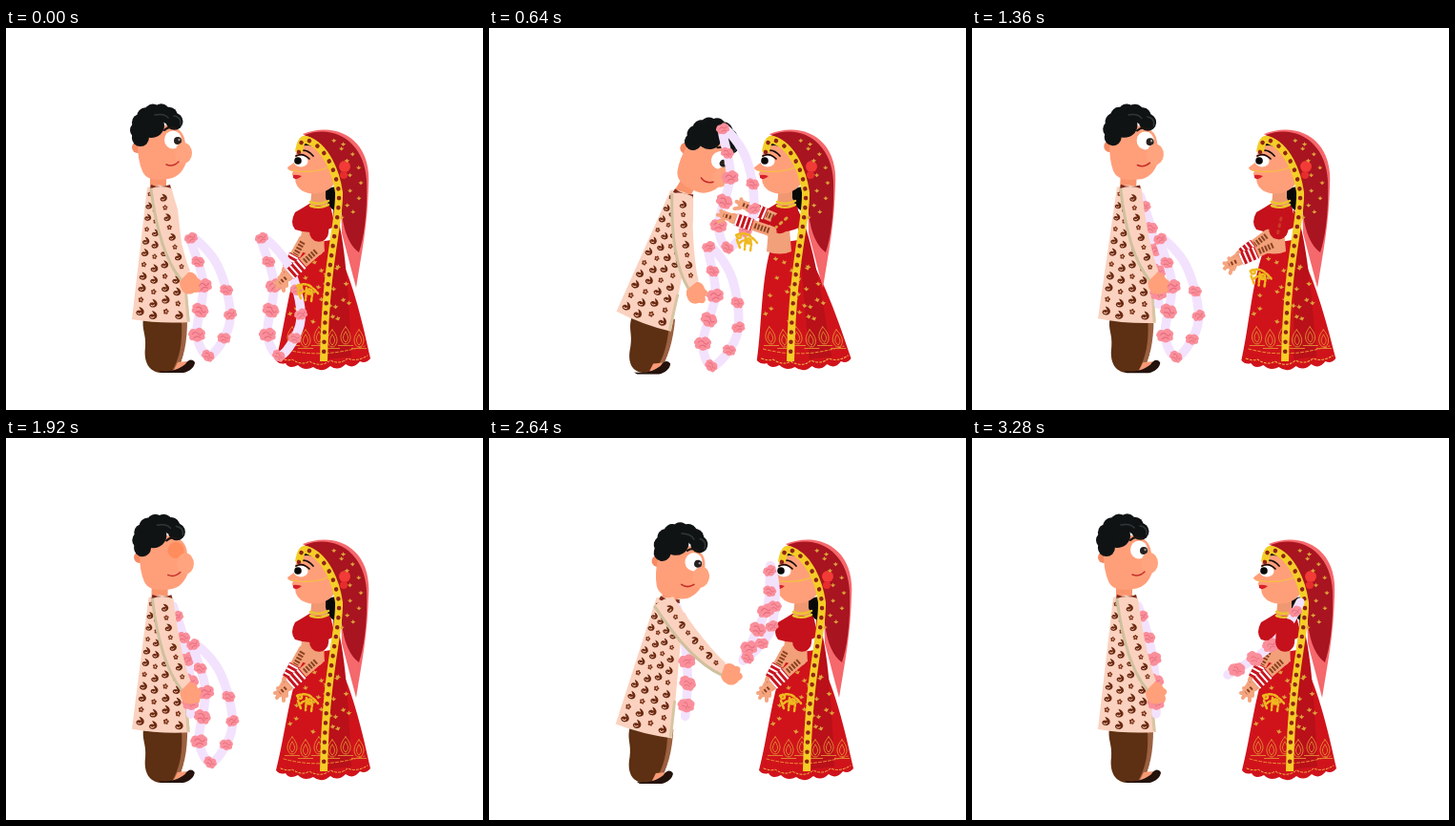
Recreate the animation shown at these times as an HTML page. Size 500x400 px, loop 4400 ms.

```html
<!DOCTYPE html>
<html lang="en">
<head>
<meta charset="utf-8">
<title>Garland exchange</title>
<style>
html, body { margin: 0; width: 100%; height: 100%; overflow: hidden; background: #fff; }
svg { display: block; width: 500px; height: 400px; }
.line { fill: none; stroke-linecap: round; stroke-linejoin: round; }
</style>
</head>
<body>
<svg viewBox="0 0 500 400">
  <defs>
    <g id="paisley">
      <path d="M-2-5C3-5 6-1 4 2C2 5-3 5-4 2C-4-1-1-2 1-1C0-3-1-3-2-5Z" fill="#6b2a12"/>
      <path class="line" d="M-2 2Q0 3.500 1.500 1" stroke="#fbd2bf"/>
    </g>
    <g id="sprig" fill="#7b3318">
      <circle cx="-1.800" cy="-.8" r="1.300"/><circle cx="1.800" cy="-.8" r="1.300"/>
      <circle cy="-2.300" r="1.200"/><circle cx="-1" cy="1.500" r="1.300"/><circle cx="1.200" cy="1.500" r="1.200"/>
    </g>
    <g id="gold">
      <path d="M0 2L-3-1L-1-1L0-3L1-1L3-1Z" fill="#dda23c"/>
    </g>
    <g id="flame" class="line" stroke="#e28a32" stroke-width="1.100">
      <path d="M0-13C7-5 8 3 2 8H-2C-8 3-7-5 0-13ZM0-7C4-1 4 2 0 6C-4 2-4-1 0-7M-9 10H9"/>
    </g>
    <g id="rose">
      <path d="M-7-3Q-5-7-1-5Q3-8 6-4Q9-2 7 1Q8 5 4 5Q0 8-3 5Q-8 5-7 1Q-9-1-7-3Z" fill="#fa8f9b"/>
      <path class="line" d="M-4-1Q-1-4 1-1T5-1M-3 3Q0 0 3 3" stroke="#e56d7d"/>
    </g>
  </defs>

  <g id="legs">
    <path d="M144 304C142 316 147 320 146 334C144 350 150 360 162 361L179 360C187 345 188 330 188 306Z" fill="#5d3013"/>
    <path d="M186 304L190 305C190 328 187 347 177 361L173 361C183 345 185 328 184 307Z" fill="#9b6040"/>
  </g>
  <g id="shoe">
    <path d="M180 350L190 349L190 356L176 358Z" fill="#f79a75"/>
    <path d="M160 359C175 361 183 356 188 352C191 347 195 346 198 350C198 355 192 360 186 361H163Z" fill="#24120c"/>
  </g>

  <g id="groomHead">
    <path d="M151 148H168V172H151Z" fill="#f9946c"/>
    <ellipse cx="138" cy="125" rx="6" ry="6" fill="#f58a63"/>
    <path d="M138 123C138 108 149 103 164 102C180 102 187 109 188 121L190 137C187 149 180 157 170 158C157 160 147 159 143 150Q138 138 138 123Z" fill="#ff9f7a"/>
    <g id="hair" fill="#101314"><ellipse cx="152" cy="102" rx="14" ry="13"/></g>
    <path class="line" d="M156 91Q166 89 170 94M176 92Q184 93 183 101" stroke="#30383a" stroke-width="1.500"/>
    <path class="line" d="M166 107Q171 102 178 105" stroke="#1b1512" stroke-width="2.200"/>
    <g id="openEye">
      <ellipse cx="175" cy="117" rx="9" ry="9.500" fill="#fff"/>
      <circle cx="180" cy="118" r="4" fill="#26201e"/><circle cx="181.500" cy="117" r="1.200" fill="#999"/>
    </g>
    <circle id="shutEye" cx="176" cy="117" r="8.500" fill="#ff8c5c"/>
    <ellipse cx="186" cy="131" rx="9" ry="11" fill="#ffa47e"/>
    <path class="line" d="M168 143Q175 146 181 140" stroke="#c4302b" stroke-width="1.500"/>
  </g>
  <g id="kurta">
    <path d="M148 167Q160 162 173 167L180 190L193 308Q161 310 132 305Z" fill="#fbd2bf"/>
    <path class="line" d="M188 270L191 306" stroke="#d8c5a3" stroke-width="3"/>
    <path d="M152 164Q161 168 172 164L173 168Q161 171 151 168Z" fill="#7b2b1c"/>
  </g>

  <g id="skirt">
    <path d="M313 226L341 222C362 255 374 310 382 346Q377 352 371 349Q364 358 356 352Q348 360 340 354Q331 362 322 355Q313 360 306 353Q297 358 293 351Q287 353 283 348C293 310 297 262 313 226Z" fill="#d0131b"/>
    <path d="M343 190C352 200 358 250 362 344L338 347Z" fill="#b91019"/>
    <path class="line" d="M288 346Q296 349 300 347Q310 354 318 349Q330 356 340 348Q350 353 358 346Q368 350 379 343" stroke="#f0b94a" stroke-dasharray="2 2"/>
    <path class="line" d="M291 336Q330 347 376 333" stroke="#ec8a35" stroke-dasharray="3 2"/>
    <g id="skirtGold"></g>
  </g>

  <g id="bride">
    <path d="M311 111C345 97 384 115 380 165C379 205 373 235 367 272L352 215L350 140Z" fill="#f5686c"/>
    <path d="M310 211H332L334 234Q322 239 308 234Z" fill="#f2a079"/>
    <path d="M318 184Q328 180 340 186L345 208Q322 218 303 211Q297 204 303 193Q310 189 318 184Z" fill="#c5111b"/>
    <path d="M321 164H338V186H319Z" fill="#ef9871"/>
    <path d="M335 170Q347 162 348 172L348 192Q340 192 335 178Z" fill="#090909"/>
    <path class="line" d="M319 182Q328 186 338 181M319 186Q328 190 338 185" stroke="#edc52d" stroke-width="2.500" stroke-dasharray="2 1"/>
    <path d="M312 119C304 127 302 136 303 140L295 146Q295 149 301 150Q298 154 303 157Q303 168 314 172C330 177 344 169 348 155L343 125Q328 112 312 119Z" fill="#ff9f7a"/>
    <path d="M308 124Q312 115 323 119L330 126Q318 121 308 124Z" fill="#100c0c"/>
    <ellipse cx="309" cy="139.500" rx="7.500" ry="6" fill="#fff"/>
    <circle cx="306" cy="139" r="3.800" fill="#080808"/>
    <path class="line" d="M304 134Q311 130 318 137M308 129Q315 126 322 134" stroke="#140b09" stroke-width="1.700"/>
    <path d="M301 154Q304 153 310 155Q305 160 301 157Z" fill="#d91f2b"/>
    <path class="line" d="M299 149Q324 154 347 142" stroke="#f3c43c" stroke-width="1.200"/>
    <path d="M313 112C345 100 376 120 378 160C379 195 375 220 370 235Q356 225 352 195C352 160 341 126 313 112Z" fill="#a81420"/>
    <circle cx="355" cy="145" r="6" fill="#f23a36"/><circle cx="354" cy="154" r="4" fill="#e72c2e"/>
    <g id="veilGold"></g>
    <path class="line" d="M307 130Q309 115 315 117C336 124 346 152 349 172C350 205 335 240 333 349" stroke="#f4cd27" stroke-width="8" style="stroke-linecap:butt"/>
    <path class="line" d="M307 130Q309 115 315 117C336 124 346 152 349 172C350 205 335 240 333 347" stroke="#8f2419" stroke-width="4.500" stroke-dasharray=".1 10"/>
  </g>
  <g id="backArm"></g>
  <g id="garlandA"></g>
  <g id="garlandB"></g>
  <g id="tassel" class="line" stroke="#efb91f" stroke-width="2.500">
    <path d="M-9-5Q0-9 6-4T13 3M-5 3Q1-3 7 4L6 11M-8 0L-5 8M1-3L0 10" stroke-dasharray="4 2"/>
    <circle cx="-6" cy="-4" r="2"/><circle cx="4" cy="1" r="2.500"/>
  </g>
  <path id="upperArm" class="line" stroke="#f2a079" stroke-width="12"/>
  <path id="sleeve" class="line" stroke="#c5111b" stroke-width="20"/>
  <path id="sleeveGold" class="line" stroke="#d8a03a" stroke-width="3" stroke-dasharray="2 5"/>
  <g id="frontArm"></g>
  <g id="groomArm">
    <ellipse cx="192" cy="267" rx="10" ry="11.500" fill="#ffa07b"/>
    <path class="line" d="M195 264L200 266M194 273L199 273" stroke="#ffa07b" stroke-width="8"/>
    <path d="M152 168Q162 164 174 168C178 200 185 235 193 254L183 264C168 245 158 215 152 168Z" fill="#fbd2bf"/>
    <path class="line" d="M152 169C158 215 168 245 183 263" stroke="#cfc09e" stroke-width="3"/>
  </g>
  <g id="petals" fill="#ff0"></g>
</svg>
<script>
const $ = id => document.getElementById(id);
const LOOP = 4400, STEP = 40;

function add(parent, tag, attrs) {
  const node = document.createElementNS('http://www.w3.org/2000/svg', tag);
  for (const key in attrs) node.setAttribute(key, attrs[key]);
  return parent.appendChild(node);
}
const stamp = (parent, id, x, y, turn = 0, size = 1) =>
  add(parent, 'use', { href: '#' + id, transform: `translate(${x} ${y}) rotate(${turn}) scale(${size})` });
const place = (id, transform) => $(id).setAttribute('transform', transform);
const show = (node, on) => node.setAttribute('display', on ? 'inline' : 'none');
const mix = (a, b, u) => a + (b - a) * u;
const mixPoint = (p, q, u) => p.map((v, i) => mix(v, q[i], u));

// Progress from 0 to 1 between two times, plain and smoothed
const linear = (t, from, to) => Math.min(1, Math.max(0, (t - from) / (to - from)));
const smooth = (t, from, to) => {
  const u = linear(t, from, to);
  return u * u * (3 - 2 * u);
};
// Rises smoothly, holds, then falls back quickly at first
const pulse = (t, start, top, hold, end) =>
  smooth(t, start, top) * (1 - linear(t, hold, end)) ** 1.6;

function seeded(seed) {
  return () => (seed = (seed * 16807) % 2147483647) / 2147483647;
}
const rand = seeded(23);

// Hair curls and fabric prints
for (let i = 0; i < 8; i++) {
  const a = Math.PI * (.86 + i * .14);
  add($('hair'), 'circle', { cx: 159 + Math.cos(a) * 20, cy: 107 + Math.sin(a) * 19, r: 9 });
}
for (let row = 0; row < 11; row++) {
  const y = 174 + row * 12.3, u = row / 10;
  for (let col = 0; col < 4; col++) {
    const x = mix(mix(150, 139, u), mix(172, 184, u), (col + .1) / 3.3);
    stamp($('kurta'), (row + col) % 3 ? 'paisley' : 'sprig', x, y + col % 2 * 4, 12, mix(.75, .95, u));
  }
}
for (let row = 0; row < 8; row++) {
  const v = row / 7;
  stamp($('groomArm'), row % 2 ? 'sprig' : 'paisley', 165 + 19 * v * (.6 + .4 * v), 178 + v * 72, 0, .85);
}
for (let i = 0; i < 28; i++) {
  const v = (i + rand()) / 28;
  stamp($('skirtGold'), 'gold', mix(mix(314, 294, v), mix(354, 370, v), rand()), 242 + v * 66, rand() * 40 - 20);
}
for (let i = 0; i < 6; i++) stamp($('skirtGold'), 'flame', 300 + i * 14, 324 + i % 2 * 3, 0, .85);
for (let i = 0; i < 13; i++) {
  const a = -1.2 + i * .17;
  stamp($('veilGold'), 'gold', 334 + Math.cos(a) * (i % 2 ? 38 : 27), 163 + Math.sin(a) * 48, 0, .9);
}

function drawForearm(id, elbow, hand) {
  const g = $(id), [x, y] = hand;
  const line = (from, to, stroke, width, dash = 'none', cap = 'butt') => add(g, 'path', {
    class: 'line', stroke, 'stroke-width': width, 'stroke-dasharray': dash, style: 'stroke-linecap:' + cap,
    d: `M${mixPoint(elbow, hand, from)}L${mixPoint(elbow, hand, to)}`
  });
  line(0, .8, '#f2a079', 11, 'none', 'round');
  line(.05, .38, '#8a4322', 6, '2 1.5');
  line(.4, .74, '#c8141f', 13);
  line(.42, .74, '#fff', 13, '2 3');
  line(.84, 1, '#f5a57f', 9, 'none', 'round');
  add(g, 'path', { class: 'line', stroke: '#f5a57f', 'stroke-width': 4,
    d: `M${x} ${y}l-3 5M${x} ${y}l-5 0M${x + 4} ${y + 2}l0 6` });
  line(.84, 1, '#87401f', 4, '2 2');
}
drawForearm('backArm', [312, 222], [290, 262]);
drawForearm('frontArm', [327, 232], [287, 267]);

// A garland is a closed curve that narrows from a held loop to a worn strand
const heldLoop = [[194, 220], [207, 268], [200, 320], [214, 343], [235, 305], [222, 249]];

function strand(top, bend, tip) {
  return heldLoop.map((_, i) => {
    const u = 1 - Math.abs(1 - i / 3);
    return mixPoint(mixPoint(top, bend, u), mixPoint(bend, tip, u), u);
  });
}
function closedCurve(points) {
  const at = i => points[(i + points.length) % points.length];
  const handle = (p, a, b) => p.map((v, k) => v + (b[k] - a[k]) / 6);
  return 'M' + points[0] + points.map((p, i) =>
    `C${handle(p, at(i - 1), at(i + 1))} ${handle(at(i + 1), at(i + 2), p)} ${at(i + 1)}`).join('');
}
function makeGarland(id, shiftX, worn) {
  const g = $(id);
  const tube = add(g, 'path', { class: 'line', stroke: '#f3e2fd', 'stroke-width': 9.5 });
  const roses = Array.from({ length: 9 }, () => stamp(g, 'rose', 0, 0));
  return (wear, dx, dy, turn) => {
    const points = heldLoop.map(([x, y], i) => mixPoint([x + shiftX, y], worn[i], wear));
    tube.setAttribute('d', closedCurve(points));
    const length = tube.getTotalLength();
    roses.forEach((rose, i) => {
      const p = tube.getPointAtLength(length * mix(i * .094, (i + .5) / 10, wear));
      rose.setAttribute('transform',
        `translate(${p.x} ${p.y}) rotate(${i * 40 % 70 - 25}) scale(${i > 1 && i < 5 ? 1.15 : .9})`);
    });
    place(id, `translate(${dx} ${dy}) rotate(${turn} ${mixPoint(points[1], points[4], .5)})`);
  };
}
const garlandA = makeGarland('garlandA', 74, strand([174, 176], [195, 225], [193, 289]));
const garlandB = makeGarland('garlandB', 0, strand([344, 172], [325, 220], [268, 248]));

// Petal shower
const petals = Array.from({ length: 14 }, (_, i) => ({
  x: 118 + (i * 5 % 14 + rand()) * 22, y: -190 + i * 19, drift: rand() * .06 - .01,
  node: add($('petals'), 'path', { d: 'M-5-2Q-2-6 3-5Q6-1 4 4Q-1 6-4 4Z' })
}));
function drawPetals(age) {
  for (const { x, y, drift, node } of petals) {
    const fall = y + 1.12 * age;
    show(node, age >= 0 && age < 520 && fall > -8 && fall < 388);
    node.setAttribute('transform', `translate(${x + drift * age} ${fall})`);
  }
}

function render(t) {
  const bow = pulse(t, 160, 640, 680, 1560);
  const give = pulse(t, 1880, 2240, 2440, 3280);
  const reach = smooth(t, 160, 640) - smooth(t, 1000, 1560);
  const wearA = smooth(t, 680, 1080), wearB = smooth(t, 2440, 2840);

  const lean = 17.5 * (bow + give);
  const body = `rotate(${lean} 160 306)`;
  const armTurn = -9 * bow - 89 * give ** 2;
  place('legs', `translate(${lean * 2} 0) skewX(${-lean * .32})`);
  place('shoe', `translate(${-lean * .45} ${lean * .08})`);
  place('kurta', body);
  place('groomHead', `translate(${lean * .1} ${8 * give}) ${body} rotate(${14 * bow + 3 * give} 160 165)`);
  place('groomArm', `translate(${armTurn * .11} 0) ${body} rotate(${armTurn} 162 172)`);
  const blink = t >= 1840 && t < 1960;
  show($('openEye'), !blink);
  show($('shutEye'), blink);

  const elbow = [327 - 31 * reach, 232 - 19 * reach], shoulder = [329 - 17 * reach, 199];
  const armTo = u => `M${shoulder}L${mixPoint(shoulder, elbow, u)}`;
  place('skirt', `matrix(1 0 ${.115 * reach} 1 ${-42.25 * reach} 0)`);
  place('bride', `translate(${-17 * reach} 0)`);
  place('backArm', `translate(${-5 * reach} ${-20 * reach}) rotate(${84 * reach} 312 222)`);
  place('frontArm', `translate(${-31 * reach} ${-19 * reach}) rotate(${60 * reach} 327 232)`);
  place('tassel', `translate(${314 - 46 * reach} ${275 - 53 * reach})`);
  $('upperArm').setAttribute('d', armTo(1));
  $('sleeve').setAttribute('d', armTo(.45));
  $('sleeveGold').setAttribute('d', armTo(.7));
  $('sleeveGold').setAttribute('opacity', reach);

  const liftA = smooth(t, 160, 640) * (1 - wearA), liftB = give * (1 - wearB);
  garlandA(wearA, -30 * liftA + 1.6 * lean * wearA, -112 * liftA + .2 * lean * wearA,
    6 * liftA + 8 * give);
  garlandB(wearB, 28 * bow + 67 * liftB + .7 * lean * wearB,
    12 * bow - 105 * liftB - 5 * lean * wearB, 7 * bow);
  drawPetals(t < 2000 ? t - 680 : t - 2760);
}

const start = performance.now();
function tick() {
  const t = (performance.now() - start) % LOOP;
  render(Math.floor(t / STEP) * STEP);
  requestAnimationFrame(tick);
}
tick();
</script>
</body>
</html>
```
